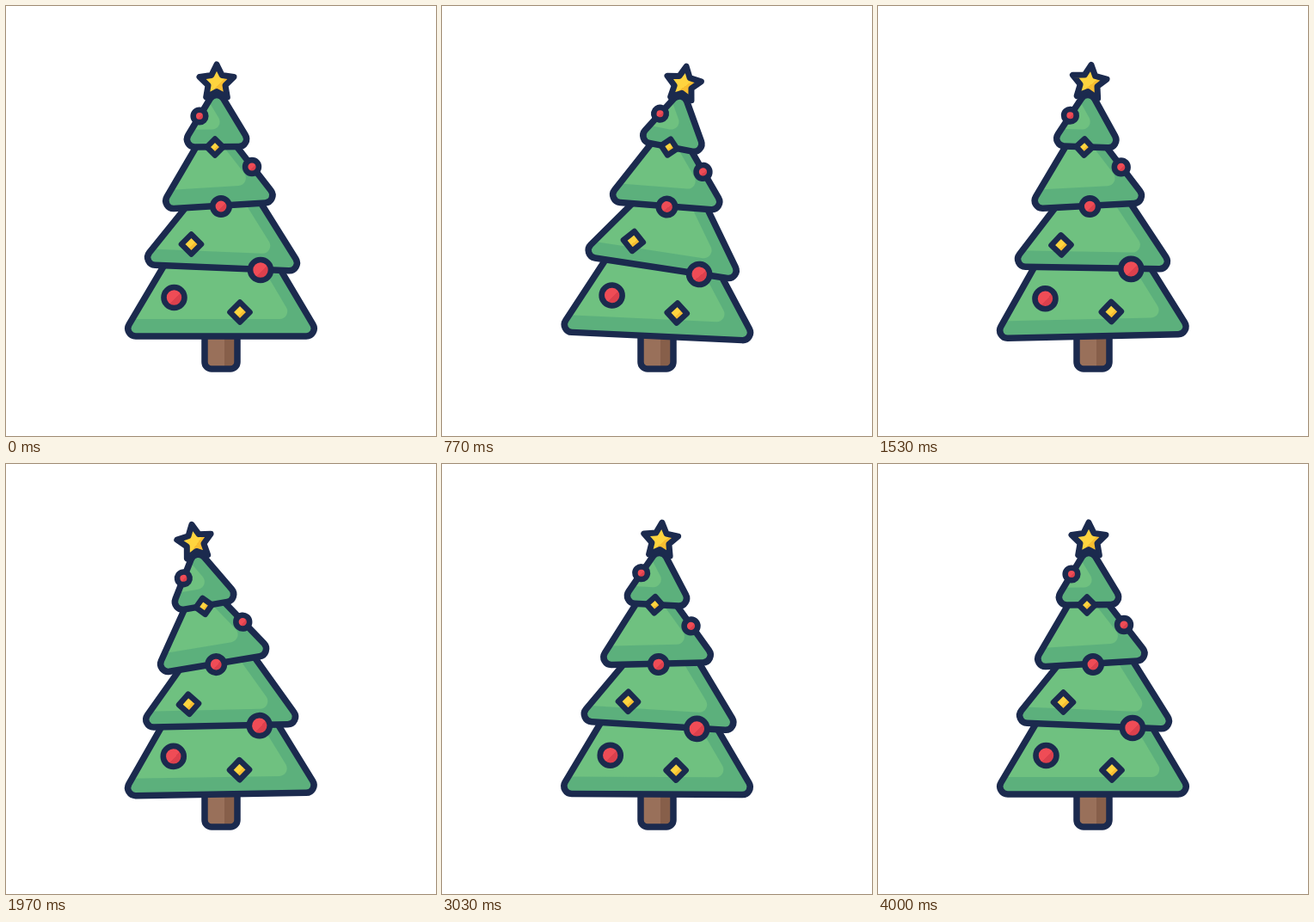
These frames come from a looping animation (500 by 500 pixels, 4060 ms). An HTML page with a canvas:

```html
<!DOCTYPE html>
<html>
<head>
<meta charset="utf-8">
<style>
html, body { margin: 0; width: 100%; height: 100%; overflow: hidden; background: #fff }
canvas { display: block }
</style>
</head>
<body>
<canvas width="500" height="500"></canvas>
<script>
const ctx = document.querySelector('canvas').getContext('2d');
const LOOP = 4060;
const INK = '#1b2a4e', GREEN = '#6fc180', SHADE = '#5cb07c';
const RED = ['#ef4c56', '#dc404d'], GOLD = ['#ffd43f', '#f8bd30'];

// Fading swing, as [ms, strength] at its turning points
const SWING = [[30, 0], [720, 1], [1700, -.6], [2450, .27], [3500, 0]];

// From the ground up: left, right and top corner; largest tilt; delay behind the swing
const tiers = [
  { shape: [[135, 384], [365, 384], [250, 190]], gain: 2.7, lag: 0,
    balls: [[195.5, 339, 12]], gems: [[272, 356, 11.5]] },
  { shape: [[155.5, 300.5], [346, 308.5], [260, 171]], gain: 6.6, lag: 150,
    balls: [[296, 307, 12]], gems: [[215.5, 277, 11.5]] },
  { shape: [[178.5, 236.5], [318.5, 228], [241.5, 129]], gain: 10, lag: 260,
    balls: [[250, 233, 9.7], [286, 187, 7.9]], gems: [] },
  { shape: [[203.5, 164], [286.5, 163.5], [245, 95]], gain: 16, lag: 300,
    balls: [[225, 128, 7.3]], gems: [[243, 164, 9.5]] }
];
const star = { x: 245, y: 89, size: 21, gain: 18.5, lag: 390 };

function swing(t) {
  const i = SWING.findIndex(k => k[0] > t);
  if (i < 1) return 0;
  const [[t0, a], [t1, b]] = [SWING[i - 1], SWING[i]];
  return a + (b - a) * (1 - Math.cos(Math.PI * (t - t0) / (t1 - t0))) / 2;
}

function turn([x, y], degrees) {
  ctx.translate(x, y);
  ctx.rotate(degrees * Math.PI / 180);
  ctx.translate(-x, -y);
}

const middle = (p, q) => [(p[0] + q[0]) / 2, (p[1] + q[1]) / 2];

function poly(points, r) {
  ctx.beginPath();
  ctx.moveTo(...middle(points[0], points.at(-1)));
  points.forEach((p, i) =>
    ctx.arcTo(...p, ...middle(p, points[(i + 1) % points.length]), r));
  ctx.closePath();
}

// Two flat tones split along a diagonal
function twoTone(x, y, r, [light, dark]) {
  const g = ctx.createLinearGradient(x - r, y - r, x + r, y + r);
  g.addColorStop(.55, light);
  g.addColorStop(.55, dark);
  ctx.fillStyle = g;
  ctx.fill();
  ctx.stroke();
}

function ball(x, y, r) {
  ctx.beginPath();
  ctx.arc(x, y, r, 0, 7);
  twoTone(x, y, r, RED);
}

// Corners of a regular figure, alternating between two radii
function ring(x, y, n, outer, inner) {
  return Array.from({ length: n }, (_, i) => {
    const r = i % 2 ? inner : outer, a = i * 2 * Math.PI / n;
    return [x + r * Math.sin(a), y - r * Math.cos(a)];
  });
}

function gem(x, y, r) {
  poly(ring(x, y, 4, r, r), 0);
  twoTone(x, y, r, GOLD);
}

function drawTier({ shape, balls, gems }) {
  ctx.lineWidth = 7.5;
  poly(shape, 9);
  ctx.fillStyle = SHADE;
  ctx.fill();
  // The lit area is the same shape moved up and left
  ctx.save();
  ctx.clip();
  poly(shape.map(([x, y]) => [x - 31, y - 20]), 9);
  ctx.fillStyle = GREEN;
  ctx.fill();
  ctx.restore();
  poly(shape, 9);
  ctx.stroke();
  ctx.lineWidth = 6.6;
  balls.forEach(b => ball(...b));
  gems.forEach(g => gem(...g));
}

function drawStar({ x, y, size }) {
  ctx.lineWidth = 7;
  poly(ring(x, y, 10, size, size / 2), 0);
  twoTone(x, y, size, GOLD);
}

function drawTrunk() {
  ctx.lineWidth = 7.5;
  ctx.beginPath();
  ctx.roundRect(231, 370, 38, 52, 8);
  ctx.fillStyle = '#99705a';
  ctx.fill();
  ctx.fillStyle = '#875f4a';
  ctx.fillRect(254, 380, 12, 39);
  ctx.stroke();
}

function frame(now) {
  const t = now % LOOP;
  ctx.setTransform(1, 0, 0, 1, 0, 0);
  ctx.fillStyle = '#fff';
  ctx.fillRect(0, 0, 500, 500);
  ctx.strokeStyle = INK;
  ctx.lineJoin = 'round';
  drawTrunk();
  // Every part hangs on the one below it and turns about the middle of its base
  let below = 0;
  const tilt = ({ gain, lag }, pivot) => {
    const angle = gain * swing(t - lag);
    turn(pivot, angle - below);
    below = angle;
  };
  for (const tier of tiers) {
    tilt(tier, middle(tier.shape[0], tier.shape[1]));
    drawTier(tier);
  }
  tilt(star, tiers.at(-1).shape[2]);
  drawStar(star);
  requestAnimationFrame(frame);
}
requestAnimationFrame(frame);
</script>
</body>
</html>
```
